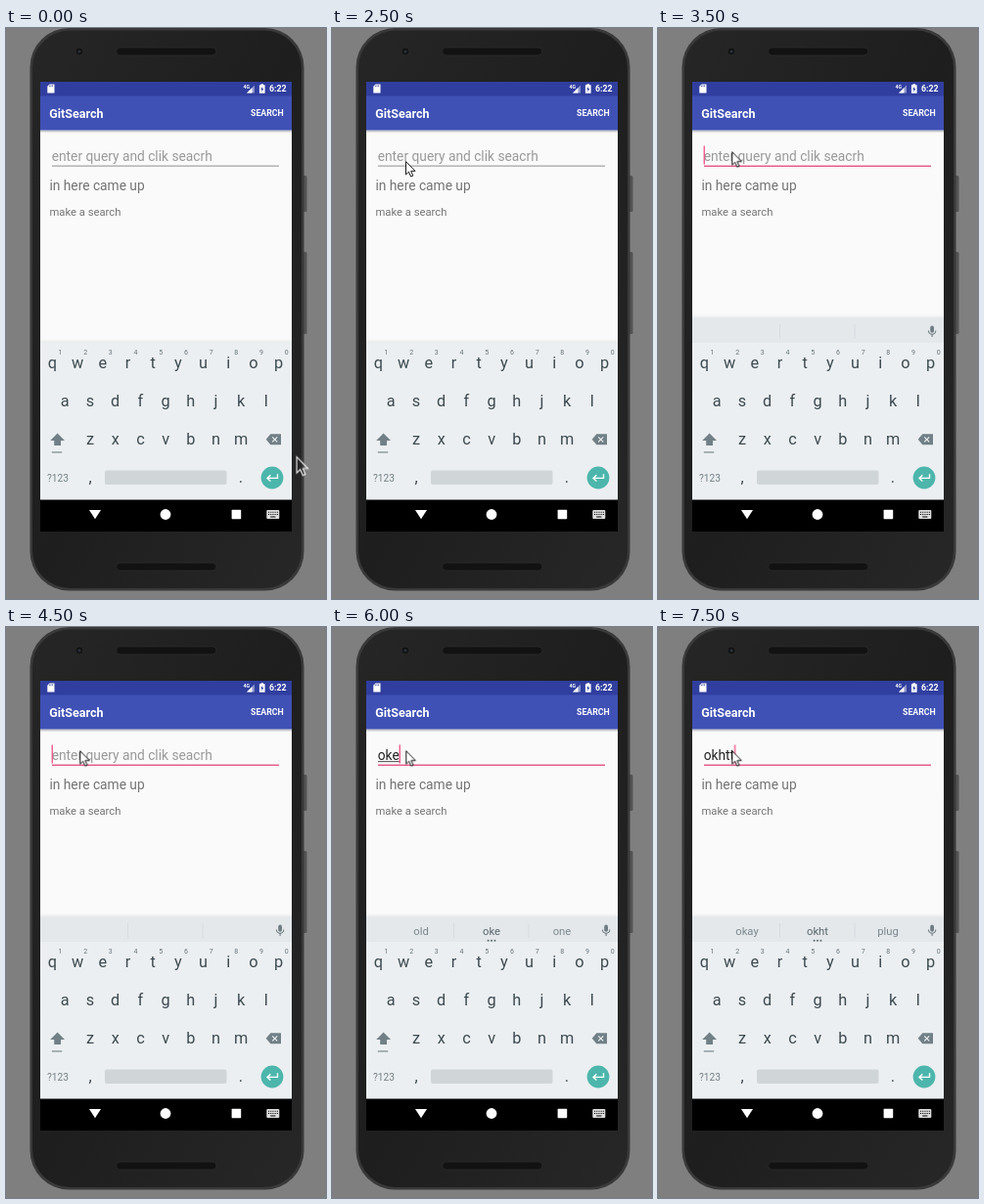
An HTML page that plays this animation: 327 by 584 pixels, repeating every 8000 ms.

```html
<!DOCTYPE html>
<html lang="en">
<head>
<meta charset="utf-8">
<title>Search app on a phone</title>
<style>
  html, body { margin: 0; width: 100%; height: 100%; overflow: hidden; background: #7f7f7f; }
  svg { display: block; width: 327px; height: 584px; font-family: Roboto, Arial, sans-serif; }
  .mid { text-anchor: middle; }
  .medium { font-weight: 600; fill: #fff; }
  .field { font-size: 13.78px; }
  .key { font-size: 16.3px; fill: #3c4a51; }
  .digit { font-size: 7px; fill: #66747b; }
  .words { font-size: 11.28px; fill: #7a888e; }
  .words .main { fill: #56656c; }

  /* Eight seconds in half-second steps of 6.25% */
  .anim { animation: 8s step-end infinite; }
  #pointer { animation-name: point; }
  #line { animation-name: focus; }
  #caret { animation-name: caret; }
  #strip { animation-name: strip; }
  #hint { animation-name: hint; }
  .typed1 { animation-name: typed1; }
  .typed2 { animation-name: typed2; }
  .last { animation-name: last; }
  .guess1 { animation-name: guess1; }
  .guess2 { animation-name: guess2; }
  .typing { animation-name: typing; }
  .composing { animation-name: composing; }

  @keyframes point {
    0% { transform: translate(296.5px, 438px) scale(1.22); opacity: 1; fill: transparent; stroke: #eee; }
    6.25% { transform: translate(252px, 379px); opacity: 0; fill: #fff; stroke: #000; }
    12.5% { transform: translate(252px, 379px); opacity: 1; }
    18.75% { transform: translate(108px, 248px); }
    25% { transform: translate(86px, 208px); }
    31.25% { transform: translate(75px, 136px); }
    37.5%, 100% { transform: translate(75.3px, 126.2px); opacity: 1; fill: #fff; stroke: #000; }
  }
  @keyframes focus {
    0% { fill: #8f8f8f; height: 1px; }
    37.5%, 100% { fill: #e4487b; height: 1.3px; }
  }
  @keyframes caret {
    0% { opacity: 0; transform: none; }
    43.75% { opacity: 1; }
    50% { opacity: 0; }
    56.25% { opacity: 1; transform: none; }
    62.5% { opacity: 1; transform: translateX(22px); }
    68.75% { opacity: 0; transform: translateX(22px); }
    75% { opacity: 1; transform: translateX(22px); }
    81.25% { opacity: 1; transform: translateX(14.8px); }
    93.75%, 100% { opacity: 1; transform: translateX(31.4px); }
  }
  @keyframes strip { 0% { opacity: 0; } 43.75%, 100% { opacity: 1; } }
  @keyframes hint { 0% { opacity: 1; } 62.5%, 100% { opacity: 0; } }
  @keyframes typing { 0% { opacity: 0; } 62.5%, 100% { opacity: 1; } }
  @keyframes typed1 { 0% { opacity: 0; } 62.5% { opacity: 1; } 81.25%, 100% { opacity: 0; } }
  @keyframes typed2 { 0% { opacity: 0; } 81.25% { opacity: 1; } 93.75%, 100% { opacity: 0; } }
  @keyframes last { 0% { opacity: 0; } 93.75%, 100% { opacity: 1; } }
  @keyframes guess1 { 0% { opacity: 0; } 62.5% { opacity: 1; } 87.5%, 100% { opacity: 0; } }
  @keyframes guess2 { 0% { opacity: 0; } 87.5% { opacity: 1; } 93.75%, 100% { opacity: 0; } }
  @keyframes composing {
    0% { opacity: 0; width: 22px; }
    62.5% { opacity: 1; width: 22px; }
    81.25% { opacity: 1; width: 14.8px; }
    93.75%, 100% { opacity: 0; width: 14.8px; }
  }
</style>
</head>
<body>
<svg viewBox="0 0 327 584">
  <defs>
    <linearGradient id="face" x2="1" y2="1">
      <stop offset="0" stop-color="#262626"/>
      <stop offset=".5" stop-color="#1e1e1e"/>
      <stop offset="1" stop-color="#272727"/>
    </linearGradient>
    <linearGradient id="drop" x2="0" y2="1">
      <stop offset="0" stop-color="#000" stop-opacity=".28"/>
      <stop offset="1" stop-color="#000" stop-opacity="0"/>
    </linearGradient>
    <linearGradient id="lift" x2="0" y2="1">
      <stop offset="0" stop-color="#000" stop-opacity="0"/>
      <stop offset="1" stop-color="#000" stop-opacity=".07"/>
    </linearGradient>
  </defs>

  <!-- Phone body -->
  <rect width="327" height="584" fill="#7f7f7f"/>
  <g fill="#545454">
    <rect x="302" y="151" width="5.5" height="37" rx="1.5"/>
    <rect x="302" y="229" width="5.5" height="84" rx="1.5"/>
  </g>
  <rect x="24.5" y="0" width="280" height="575.5" rx="40" fill="#393939"/>
  <rect x="27" y="2.5" width="275" height="570.5" rx="38" fill="url(#face)"/>
  <g fill="#121212" stroke="#2c2c2c" stroke-width=".8">
    <rect x="112.5" y="20" width="102.5" height="8" rx="4"/>
    <rect x="112.5" y="547" width="102.5" height="8" rx="4"/>
    <circle cx="75" cy="24" r="4"/>
  </g>
  <circle cx="75" cy="24" r="1.6" fill="#29313c"/>

  <!-- Screen -->
  <rect x="35" y="55" width="257" height="460" fill="#fafafa"/>
  <rect x="35" y="104.5" width="257" height="3" fill="url(#drop)"/>
  <rect x="35" y="55" width="257" height="49.5" fill="#3f51b5"/>
  <rect x="35" y="55" width="257" height="14.5" fill="#303f9f"/>
  <g fill="#fff">
    <path d="M44.5 57.5H49.5V66.5H42.3V59.7Z"/>
    <path d="M254 58.5V66.5H246Z" opacity=".45"/>
    <path d="M251.5 61V66.5H246Z"/>
    <path d="M260.5 57.2H263V58.2H264.6V66.8H258.9V58.2H260.5Z"/>
  </g>
  <path d="M262.3 59.4L260.3 62.9H261.5L261.2 65.4L263.2 62H262Z" fill="#303f9f"/>
  <path d="M44.4 58.6V60.2M46 58.3V60.2M47.6 58.3V60.2" stroke="#303f9f" stroke-width=".7"/>
  <text x="242.5" y="61.6" font-size="5.2" class="medium">4G</text>
  <text x="269" y="65.3" font-size="8.77" class="medium">6:22</text>
  <text x="44.2" y="91.8" font-size="12.53" class="medium">GitSearch</text>
  <text x="250" y="90" font-size="8.77" class="medium">SEARCH</text>

  <!-- Search field -->
  <rect id="line" class="anim" x="47" y="140.6" width="232" height="1" fill="#8f8f8f"/>
  <text id="hint" class="anim field" x="46.7" y="135.8" fill="#999">enter query and clik seacrh</text>
  <g class="field" fill="#212121">
    <text class="anim typed1" x="46.7" y="135.8">oke</text>
    <text class="anim typed2" x="46.7" y="135.8">ok</text>
    <text class="anim last" x="46.7" y="135.8">okhtt</text>
    <rect class="anim composing" x="47" y="137.3" width="22" height=".8"/>
  </g>
  <rect id="caret" class="anim" x="46.6" y="120.5" width="1.3" height="19" fill="#ef4f85"/>
  <text class="field" x="44.4" y="166" fill="#737373">in here came up</text>
  <text x="44.4" y="191.7" font-size="11.28" fill="#757575">make a search</text>

  <!-- Keyboard -->
  <rect x="35" y="318" width="257" height="4" fill="url(#lift)"/>
  <rect x="35" y="321.5" width="257" height="162" fill="#eceff1"/>
  <g id="strip" class="anim">
    <rect x="35" y="293" width="257" height="4" fill="url(#lift)"/>
    <rect x="35" y="296.5" width="257" height="25.5" fill="#e4e8eb"/>
    <path d="M124.5 303V318M201 303V318" stroke="#d3d9dc" stroke-width=".8"/>
    <path d="M276.4 309.5a3.7 3.7 0 0 0 7.4 0M280.1 313.2V316" fill="none" stroke="#6f7d83" stroke-width="1.1"/>
    <rect x="278.2" y="304.5" width="3.8" height="7.2" rx="1.9" fill="#6f7d83"/>
    <g class="anim typing" fill="#5c6b72">
      <circle cx="159.6" cy="320.7" r="1"/><circle cx="163" cy="320.7" r="1"/><circle cx="166.4" cy="320.7" r="1"/>
    </g>
  </g>
  <g id="guesses" class="words mid"></g>
  <g id="keys" class="mid"></g>
  <g fill="#718087">
    <path d="M52.6 414.5L60 422H56V427H49.2V422H45.2Z"/>
    <rect x="46.8" y="433.4" width="10.4" height="1.1"/>
    <path d="M270.3 415.3H281V426.3H270.3L265.7 420.8Z"/>
    <text x="42" y="463.6" font-size="10.2">?123</text>
  </g>
  <path d="M272.2 418.3L277.2 423.3M277.2 418.3L272.2 423.3" stroke="#eceff1" stroke-width="1.2"/>
  <rect x="101" y="452.5" width="124.5" height="14.5" rx="2" fill="#d0d5d8"/>
  <circle cx="272" cy="460" r="11.4" fill="#4db6ac"/>
  <path d="M277.5 456.2V460.4H267.3M270.3 457.2L267 460.4L270.3 463.6" fill="none" stroke="#fff" stroke-width="1.4"/>

  <!-- Navigation bar -->
  <rect x="35" y="482.5" width="257" height="32.5"/>
  <g fill="#fff">
    <path d="M85 493H97L91 502.3Z"/>
    <circle cx="163" cy="497.5" r="5.4"/>
    <rect x="230.6" y="492.8" width="9.6" height="9.4" rx=".7"/>
    <rect x="266.3" y="493" width="13" height="9" rx="1" fill="#ddd"/>
  </g>
  <path d="M268 495.3H278M268 497.5H278" stroke="#000" stroke-width="1.1" stroke-dasharray="1.1 1.1"/>
  <path d="M270.2 500H275.4" stroke="#000" stroke-width="1"/>

  <path id="pointer" class="anim" d="M.5 .5V13.9L3.5 11.1L5.6 16L7.8 15.1L5.7 10.3H10Z" stroke-width=".9"/>
</svg>
<script>
  const NS = "http://www.w3.org/2000/svg";
  const add = (parent, tag, attrs, text = "") => {
    const node = document.createElementNS(NS, tag);
    for (const name in attrs) node.setAttribute(name, attrs[name]);
    node.textContent = text;
    return parent.appendChild(node);
  };

  const keys = document.getElementById("keys");
  const pitch = 25.7;
  const row = (chars, x, y, cls) =>
    [...chars].forEach((c, i) => add(keys, "text", { x: x + i * pitch, y, class: cls }, c));
  row("qwertyuiop", 47.3, 347.8, "key");
  row("1234567890", 55.4, 333.6, "digit");
  row("asdfghjkl", 60.2, 387.2, "key");
  row("zxcvbnm", 86, 426.4, "key");
  row(",", 86.2, 464.8, "key");
  row(".", 240, 464.8, "key");

  const guesses = document.getElementById("guesses");
  const suggest = (cls, words) => {
    const group = add(guesses, "g", { class: "anim " + cls });
    words.forEach((word, i) =>
      add(group, "text", { x: 91 + i * 72, y: 314.7, class: i === 1 ? "main" : "" }, word));
  };
  suggest("guess1", ["old", "oke", "one"]);
  suggest("guess2", ["oh", "ok", "on"]);
  suggest("last", ["okay", "okht", "plug"]);
</script>
</body>
</html>
```
